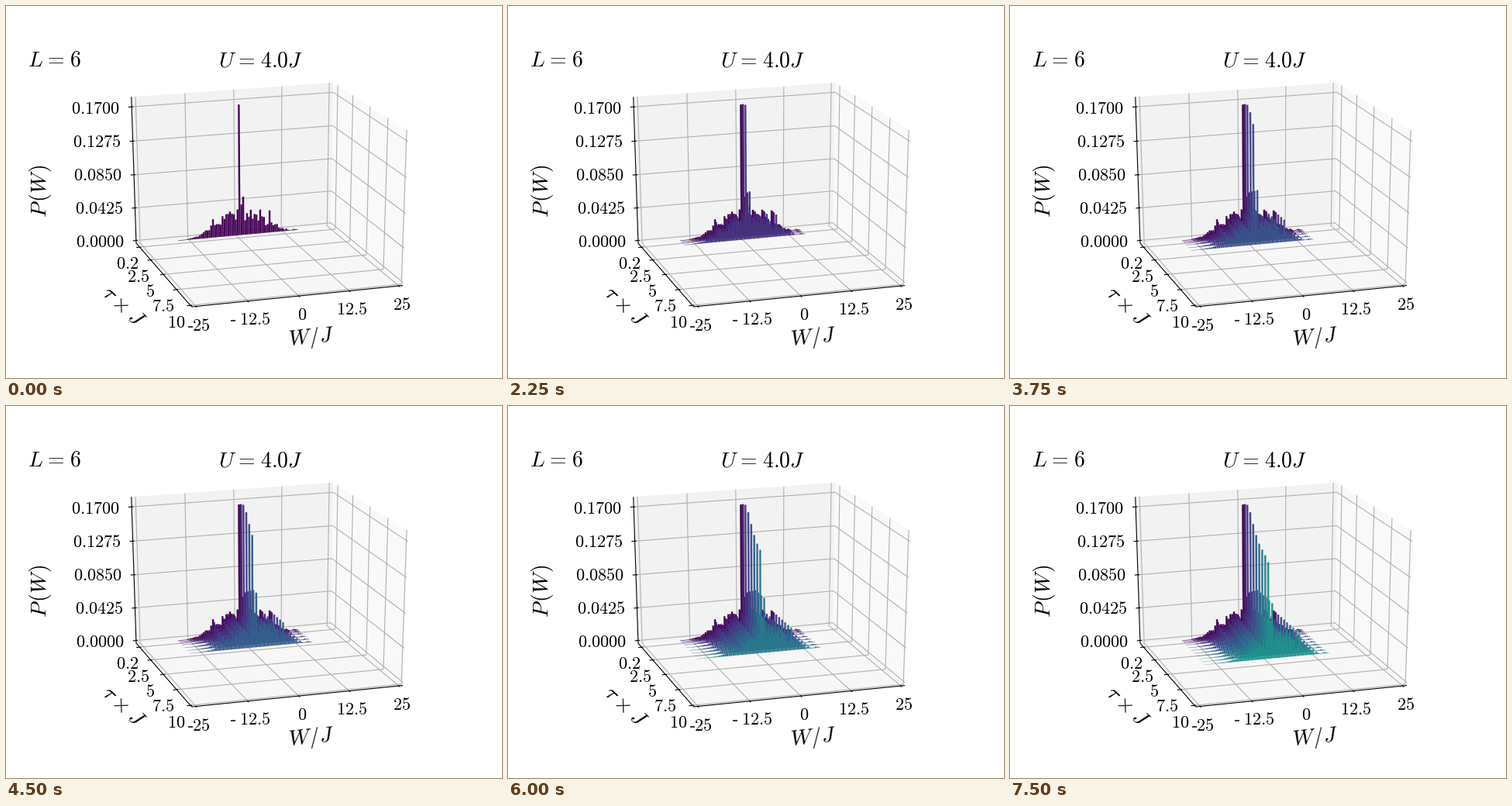
Write a matplotlib script that moves like this. It is 640 px wide and 480 px high and loops after 8 s.

```python
import numpy as np
import matplotlib.pyplot as plt
from matplotlib.animation import FuncAnimation
from matplotlib.collections import PolyCollection

plt.rcParams["mathtext.fontset"] = "cm"

WIDTH, HEIGHT, DPI = 640, 480, 100
AZIM, ELEV, DIST = np.radians(17.5), np.radians(21.3), 10
CENTER, SCALE = (334.7, 237.4), (268.1, 199.8)

# axis limits without the pane margin PAD
W_LIM, T_LIM, P_LIM = (-25, 25), (-0.3, 10), (0, 0.1785)
PAD = 1 / 48

W_TICKS = [-25, -12.5, 0, 12.5, 25]
T_TICKS = [0.2, 2.5, 5, 7.5, 10]
P_TICKS = [0, 0.0425, 0.085, 0.1275, 0.17]

TIMES = [0.2, 0.4, 0.6] + [1 + 0.5 * i for i in range(8)]
PEAKS = [0.1674, 0.1686, 0.170, 0.1713, 0.165, 0.1533,
         0.1425, 0.1348, 0.1303, 0.1265, 0.121]
# bar heights in thousandths, left and right of the main peak
LEFT = [.4, .4, .4, .5, .6, 1, 1.5, 2, 2.5, 3, 3, 4.5, 6, 8, 10, 10, 10,
        16, 24, 16, 17, 17, 16, 27, 23, 29, 29, 32, 29, 28, 21, 34]
RIGHT = [40, 50, 19, 28, 23, 32, 20, 26, 25, 17, 31, 22, 21, 10, 11, 29,
         13, 9, 10, 10, 5, 4, 4, 2, 3, 1, .5, .6, 1.5, 1, .4]
STEP, BAR_W, BAR_T = 0.5, 0.45, 0.03


def unit(value, lim):
    return (value - lim[0]) / (lim[1] - lim[0]) - 0.5


def project_unit(w, t, p):
    """Perspective view of the unit cube in stage pixels."""
    right = t * np.sin(AZIM) + w * np.cos(AZIM)
    near = t * np.cos(AZIM) - w * np.sin(AZIM)
    depth = near * np.cos(ELEV) + p * np.sin(ELEV)
    up = p * np.cos(ELEV) - near * np.sin(ELEV)
    f = DIST / (DIST - depth)
    return CENTER[0] + SCALE[0] * right * f, CENTER[1] - SCALE[1] * up * f


def project(w, t, p):
    return project_unit(unit(w, W_LIM), unit(t, T_LIM), unit(p, P_LIM))


fig = plt.figure(figsize=(WIDTH / DPI, HEIGHT / DPI), dpi=DPI, facecolor="white")
ax = fig.add_axes([0, 0, 1, 1])
ax.set_xlim(0, WIDTH)
ax.set_ylim(HEIGHT, 0)
ax.axis("off")

LO, HI = -0.5 - PAD, 0.5 + PAD


def path(points, color, zorder, lw=0.8):
    x, y = zip(*(project_unit(*p) for p in points))
    ax.plot(x, y, color=color, lw=lw, zorder=zorder, solid_capstyle="butt",
            solid_joinstyle="round")


def pane(points, shade):
    ax.fill(*zip(*(project_unit(*p) for p in points)),
            color=str(shade), lw=0, zorder=1)


def draw_box():
    pane([(LO, LO, LO), (HI, LO, LO), (HI, LO, HI), (LO, LO, HI)], 0.95)
    pane([(HI, LO, LO), (HI, HI, LO), (HI, HI, HI), (HI, LO, HI)], 0.975)
    pane([(LO, LO, LO), (HI, LO, LO), (HI, HI, LO), (LO, HI, LO)], 0.967)

    inner, outer = 0.1 / 12, 0.2 / 12
    grid = "#b0b0b0"
    for tick in W_TICKS:
        w = unit(tick, W_LIM)
        path([(w, HI, LO), (w, LO, LO), (w, LO, HI)], grid, 2)
        path([(w, HI + outer, LO), (w, HI - inner, LO)], "black", 4)
    for tick in T_TICKS:
        t = unit(tick, T_LIM)
        path([(LO, t, LO), (HI, t, LO), (HI, t, HI)], grid, 2)
        path([(LO - outer, t, LO), (LO + inner, t, LO)], "black", 4)
    for tick in P_TICKS:
        p = unit(tick, P_LIM)
        path([(LO, LO, p), (HI, LO, p), (HI, HI, p)], grid, 2)
        path([(LO - outer, LO, p), (LO + inner, LO, p)], "black", 4)

    path([(LO, LO, HI), (LO, LO, LO)], "black", 4)
    path([(LO, LO, LO), (LO, HI, LO)], "black", 4)
    path([(LO, HI, LO), (HI, HI, LO)], "black", 4)


def label(x, y, text, size=16, ha="center", angle=0):
    ax.text(x, y, f"${text}$", fontsize=size, ha=ha, va="baseline",
            rotation=angle, rotation_mode="anchor", zorder=5)


def hyphen(x, y):
    ax.plot([x, x + 5.6], [y, y], color="black", lw=1.1, zorder=5,
            solid_capstyle="butt")


def draw_text():
    for i, value in enumerate(P_TICKS):
        label(121.9 - 1.6 * i, 311.3 - 43.1 * i, f"{value:.4f}")
    for x, y, text in [(157, 339, "0.2"), (171, 356, "2.5"), (186, 375, "5"),
                       (203, 394, "7.5"), (220, 415, "10"),
                       (252, 419, "25"), (321, 411, "12.5"), (382.5, 405, "0"),
                       (446, 398, "12.5"), (511, 392, "25")]:
        label(x, y, text)
    hyphen(235, 414)
    hyphen(290, 406)

    equals = r"\hspace{0.08}=\hspace{0.08}"
    label(28, 77, f"L{equals}6", 20, "left")
    label(329, 78.5, f"U{equals}4.0J", 20)
    label(395, 435, "W/J", 20, angle=5.8)
    label(146, 393.4, r"\tau\hspace{0.04}\times\hspace{0.04}J", 20, angle=-43)
    label(52, 238.5, r"P\hspace{0.1}(W\hspace{0.04})", 20, angle=90)


def heights(i):
    """Work distribution of slice i."""
    s = i / (len(TIMES) - 1)
    k = np.arange(-len(LEFT), 0)
    left = np.array(LEFT) * (1 - 0.3 * s) * np.exp(0.05 * s * k)
    right = np.array(RIGHT, dtype=float)
    right[1] += 20 * min(1, i / 5)
    right[0] += 8 * s
    return np.concatenate([left / 1000, [PEAKS[i]], right / 1000])


def bars(i):
    color = np.array(plt.cm.viridis(i / 20))
    dark = color * [0.78, 0.78, 0.78, 1]
    t1 = TIMES[i]
    t0 = t1 - BAR_T
    polys, colors = [], []
    probs = heights(i)
    # far bars first
    for n in range(len(probs) - 1, -1, -1):
        p = probs[n]
        w0 = (n - len(LEFT)) * STEP + (STEP - BAR_W) / 2
        w1 = w0 + BAR_W
        polys += [
            [project(*v) for v in [(w0, t0, 0), (w0, t1, 0), (w0, t1, p), (w0, t0, p)]],
            [project(*v) for v in [(w0, t0, p), (w1, t0, p), (w1, t1, p), (w0, t1, p)]],
            [project(*v) for v in [(w0, t1, 0), (w1, t1, 0), (w1, t1, p), (w0, t1, p)]],
        ]
        colors += [dark, color, color]
    return PolyCollection(polys, facecolors=colors, edgecolors="none",
                          linewidths=0, zorder=3 + i / 100)


draw_box()
draw_text()
slices = [ax.add_collection(bars(i), autolim=False) for i in range(len(TIMES))]

INTERVAL, FRAMES, HOLD = 250, 32, 3


def update(frame):
    shown = frame // HOLD + 1
    for i, item in enumerate(slices):
        item.set_visible(i < shown)
    return slices


anim = FuncAnimation(fig, update, frames=FRAMES, interval=INTERVAL,
                     init_func=lambda: update(0), repeat=True, repeat_delay=0)
plt.show()
```
